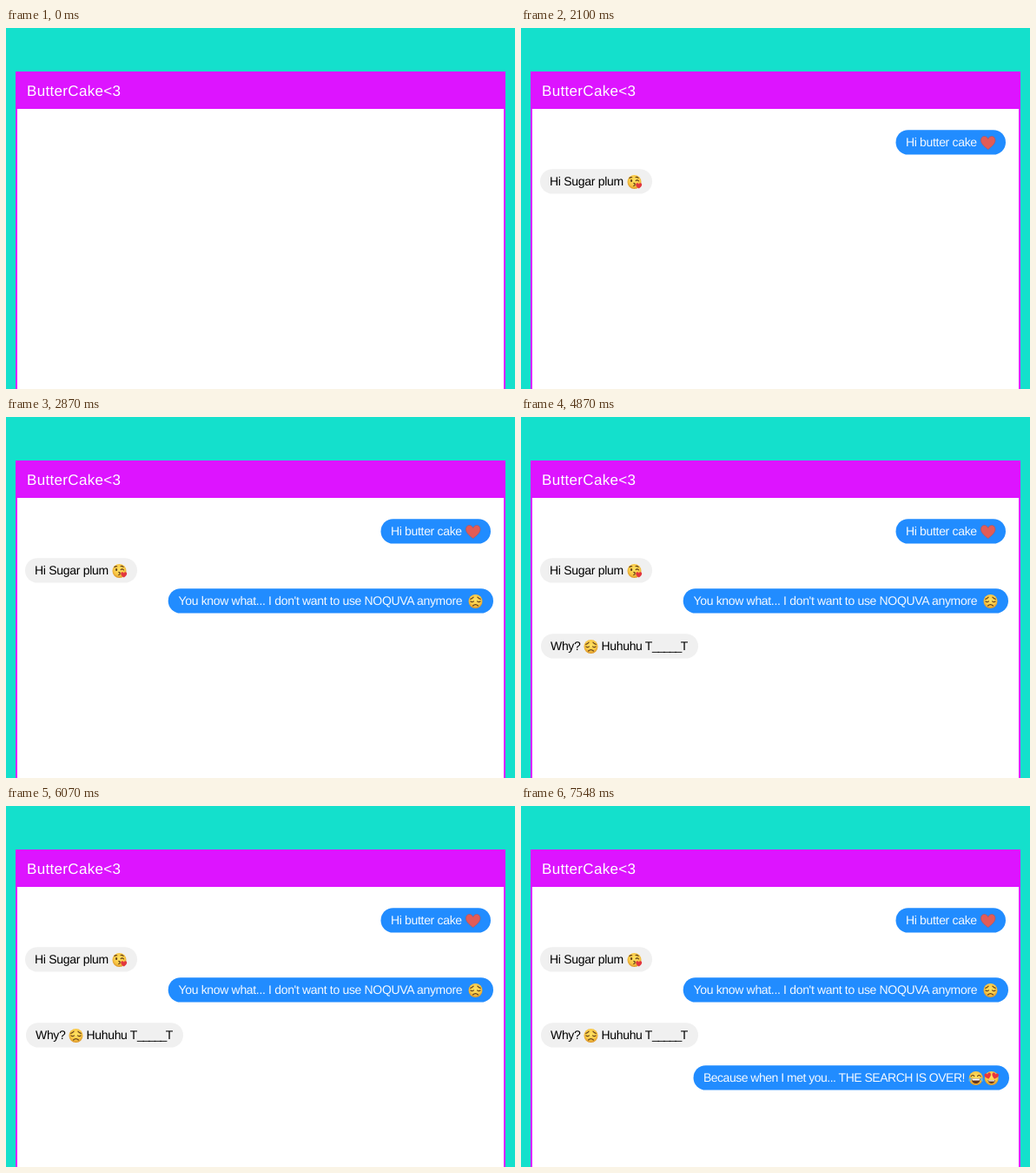
Animation, 586 px wide and 415 px high, one loop 8 s. Source, as an HTML page:

```html
<!DOCTYPE html>
<html lang="en">
<head>
<meta charset="utf-8">
<title>Chat</title>
<style>
  html, body { margin: 0; width: 100%; height: 100%; overflow: hidden; background: #14e0cc; }
  svg { display: block; }
  text { font-family: "Liberation Sans", Arial, sans-serif; font-size: 14px; text-rendering: geometricPrecision; white-space: pre; }
  .line { fill: none; stroke: #65401b; stroke-width: 1.1; stroke-linecap: round; }
  .title { font-size: 17px; letter-spacing: .33px; fill: #fff; }
</style>
</head>
<body>
<svg width="586" height="415" viewBox="0 0 586 415">
  <defs>
    <radialGradient id="skin" cx=".5" cy=".4" r=".6">
      <stop offset="0" stop-color="#ffe263"/>
      <stop offset=".65" stop-color="#f9c846"/>
      <stop offset="1" stop-color="#dc9427"/>
    </radialGradient>
    <path id="love" d="M0 7.6C-3 5.2-8.3 1.6-8.3-3C-8.3-8.2-2-9.2 0-4.4C2-9.2 8.3-8.2 8.3-3C8.3 1.6 3 5.2 0 7.6Z"/>
    <circle id="face" r="8" fill="url(#skin)"/>
    <g id="heart">
      <use href="#love" fill="#e25c56" stroke="#a9525f" stroke-width=".6"/>
    </g>
    <g id="kiss">
      <use href="#face"/>
      <path class="line" d="M-5.6-4.4Q-4.4-5.8-2.8-5.2M1.6-5.4Q3.2-6 4.6-4.6M1.6-1.4Q3.2-2.8 5-1.2"/>
      <ellipse cx="-3.4" cy="-1.5" rx="1.1" ry="1.5" fill="#65401b"/>
      <path class="line" d="M-.8 1.2Q1.6 1.4.2 2.8Q1.6 3.6-.8 4.6"/>
      <use href="#love" transform="translate(5.2 4.4) scale(.42)" fill="#e2373f"/>
    </g>
    <g id="sad">
      <use href="#face"/>
      <path class="line" d="M-5.8-2.6Q-3.8-3-2.4-4.8M5.8-2.6Q3.8-3 2.4-4.8M-5.6-.2Q-4 1.4-2-.1M5.6-.2Q4 1.4 2-.1M-3 5Q0 2.2 3 5"/>
    </g>
    <g id="joy">
      <use href="#face"/>
      <path class="line" d="M-5.6-2.2Q-3.8-4.8-1.8-2.4M5.6-2.2Q3.8-4.8 1.8-2.4"/>
      <path d="M-5 .4H5C5 7.8-5 7.8-5 .4Z" fill="#65351c"/>
      <path d="M-4.6.6H4.6L4 2.4H-4Z" fill="#fff"/>
      <path d="M-5.4-1Q-9.4.6-8 3.4Q-5.6 4.2-5.4-1ZM5.4-1Q9.4.6 8 3.4Q5.6 4.2 5.4-1Z" fill="#55b5ee"/>
    </g>
    <g id="adore">
      <use href="#face"/>
      <use href="#love" transform="translate(-4.2 -2.6) rotate(-12) scale(.46)" fill="#e8353d"/>
      <use href="#love" transform="translate(4.2 -2.6) rotate(12) scale(.46)" fill="#e8353d"/>
      <path d="M-4.2 2H4.2C3.6 7.4-3.6 7.4-4.2 2Z" fill="#65351c"/>
      <path d="M-3.7 2.2H3.7L3.2 3.5H-3.2Z" fill="#fff"/>
    </g>
  </defs>
  <rect width="586" height="415" fill="#14e0cc"/>
  <path d="M11 50H575V415H11Z" fill="#dd14ff"/>
  <path d="M13 93H573V415H13Z" fill="#fff"/>
  <text class="title" x="24" y="78">ButterCake&lt;3</text>
  <g id="chat"></g>
</svg>
<script>
const LOOP = 8000;
const BLUE = { fill: "#218cff", ink: "#f4f9ff" };
const GREY = { fill: "#f0f0f0", ink: "#000" };

// Text parts are [x, words, tracking]; faces are [id, x].
const messages = [
  { at: 1000, look: BLUE, x: 431.5, y: 117.2, w: 126.5,
    parts: [[443, "Hi butter cake", -.33]], faces: [["heart", 537.7]] },
  { at: 2100, look: GREY, x: 22, y: 162.2, w: 129,
    parts: [[33, "Hi Sugar plum", -.29]], faces: [["kiss", 130.5]] },
  { at: 2870, look: BLUE, x: 186.7, y: 197.2, w: 374.3,
    parts: [[198.5, "You know what... I don't want to use NOQUVA anymore", -.33]], faces: [["sad", 540.5]] },
  { at: 4870, look: GREY, x: 23, y: 249.2, w: 181,
    parts: [[34, "Why?", -.33], [92.5, "Huhuhu T", -.33], [151, "_____", -1.15], [183.8, "T", 0]], faces: [["sad", 80.5]] },
  { at: 6870, look: BLUE, x: 198.5, y: 298.2, w: 363.5,
    parts: [[210, "Because when I met you... THE SEARCH IS OVER!", -.5]], faces: [["joy", 523.7], ["adore", 541.7]] }
];

function add(parent, tag, attrs, words) {
  const el = document.createElementNS("http://www.w3.org/2000/svg", tag);
  for (const key in attrs) el.setAttribute(key, attrs[key]);
  if (words) el.textContent = words;
  return parent.appendChild(el);
}

const chat = document.getElementById("chat");
for (const m of messages) {
  m.el = add(chat, "g", { visibility: "hidden" });
  add(m.el, "rect", { x: m.x, y: m.y, width: m.w, height: 28.4, rx: 14.2, fill: m.look.fill });
  for (const [x, words, gap] of m.parts)
    add(m.el, "text", { x, y: m.y + 18.8, fill: m.look.ink, "letter-spacing": gap }, words);
  for (const [id, x] of m.faces)
    add(m.el, "use", { href: "#" + id, x, y: m.y + 14.8 });
}

function draw(t) {
  for (const m of messages) m.el.setAttribute("visibility", t >= m.at ? "visible" : "hidden");
}

const start = performance.now();
function tick() {
  draw((performance.now() - start) % LOOP);
  requestAnimationFrame(tick);
}
tick();
</script>
</body>
</html>
```
